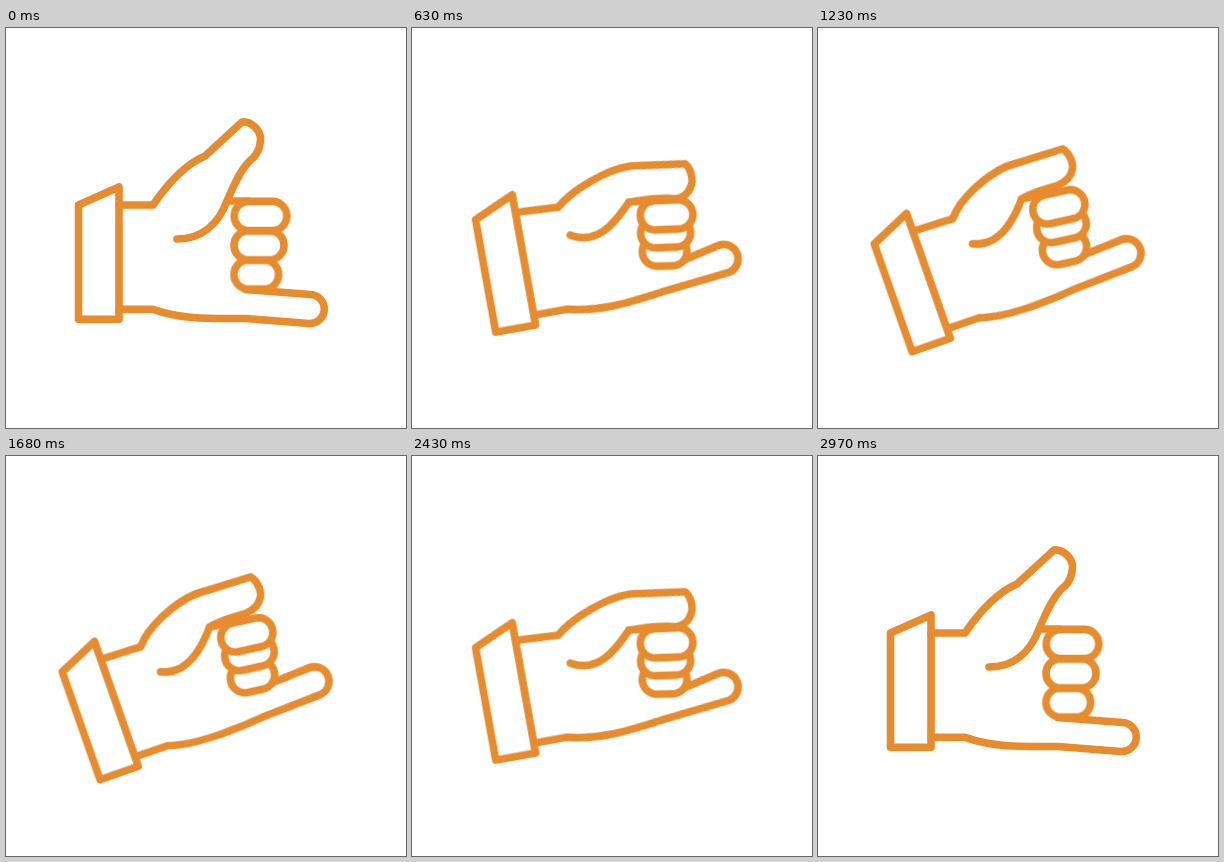
Animation of 400 by 400 pixels, one loop 3 s. Source, as an HTML page without scripts:

```html
<!DOCTYPE html>
<html lang="en">
<head>
<meta charset="utf-8">
<title>Call me</title>
<style>
html, body { margin: 0; height: 100%; overflow: hidden; background: #fff; }
svg { display: block; width: 100%; height: 100%; }
.hand {
  fill: none; stroke: #e78b2d; stroke-width: 7.6;
  stroke-linecap: round; stroke-linejoin: round;
  transform-origin: 92.5px 229.5px;
}
.hand, .hand * { animation: 3s linear infinite; }
.hand { animation-name: tilt; }
.hand .thumb { animation-name: thumb; }
.hand .pinky { animation-name: pinky; }
.finger { fill: #fff; }
.hand .f1 { animation-name: f1; }
.hand .f2 { animation-name: f2; }
.hand .f3 { animation-name: f3; }

/* One shake lasts 15% of the loop: curled at 6%, tilted back at 11%. */
@keyframes tilt {
  0%, 2%, 17%, 32%, 47%, 62%, 77%, 93%, 100% {
    transform: translateY(0) rotate(0deg);
    animation-timing-function: cubic-bezier(.47, 0, .745, .715);
  }
  6%, 21%, 36%, 51%, 66%, 81% {
    transform: translateY(10px) rotate(-10deg);
    animation-timing-function: cubic-bezier(.39, .575, .565, 1);
  }
  9.6%, 24.6%, 39.6%, 54.6%, 69.6%, 84.6% {
    transform: translateY(33px) rotate(-22deg);
    animation-timing-function: cubic-bezier(.33, 0, .67, .33);
  }
  11%, 26%, 41%, 56%, 71%, 86% {
    transform: translateY(29.4px) rotate(-19.4deg);
    animation-timing-function: cubic-bezier(.3, .2, .6, 1);
  }
}
@keyframes thumb {
  0%, 1%, 16%, 31%, 46%, 61%, 76%, 99%, 100% {
    d: path("M113 177 L147 177 C160 158 178 137 199 128 L236 94 C245 93 255 102 254.500 112 C254 120 251 126 247 130 C237 137 229 154 221 173 C212 197 195 211 171 211 M221 173 L242 173");
    animation-timing-function: ease-in-out;
  }
  6%, 21%, 36%, 51%, 66%, 81% {
    d: path("M113.700 177 L156 179.300 C172.700 165 210.800 150.300 235 151.600 L288.500 159 C293 162.800 294.600 176.300 290.600 181.700 C287.200 189.200 279.600 192 273.500 192 C260 187.500 245 186.800 226.700 186.700 C213 200.500 190.500 225 163 209 M226.700 186.700 L249.600 189.700");
  }
  11%, 26%, 41%, 56%, 71%, 86% {
    d: path("M115 178 L154.700 179.300 C169.200 162.200 201.400 149 224.200 147.600 L281.700 149.800 C287 156 287.700 169 283 173.600 C279.600 179.800 272.600 181.600 266 182.500 C252.400 182 237 180.700 226.400 183.400 C213.500 199 190.700 221.700 165.300 209.500 M226.400 183.400 L245.700 186");
    animation-timing-function: ease-in-out;
  }
  89% {
    d: path("M113 177 L147 177 C159 157 174 134 194 123 L224 82 C234 80 244 89 243.500 98 C244 107 242 114 239 119 C231 130 226 152 221 173 C212 197 195 211 171 211 M221 173 L242 173");
    animation-timing-function: ease-in-out;
  }
}
@keyframes pinky {
  0%, 15%, 30%, 45%, 60%, 75%, 90%, 100% {
    d: path("M240 261.500 L304.500 266.500 A14.500 14.500 0 0 1 303 295.500 L240 290.500 C205 290.500 178 292 147 281.300 L113 281.300");
    animation-timing-function: ease-in-out;
  }
  6%, 21%, 36%, 51%, 66%, 81% {
    d: path("M258 256.200 L307.800 245 A14.500 14.500 0 0 1 313 273.500 L243.600 281 C217.600 284.600 181 290.300 146.500 281.300 L114 281.300");
    animation-timing-function: cubic-bezier(.4, 0, .7, .8);
  }
  11%, 26%, 41%, 56%, 71%, 86% {
    d: path("M255.600 257.200 L307 254.700 A14.500 14.500 0 0 1 308 283.700 L246.500 286 C218 288.600 175 290.800 147.300 281.500 L115 281.300");
    animation-timing-function: ease-out;
  }
}
@keyframes f1 {
  0%, 15%, 30%, 45%, 60%, 75%, 90%, 100% {
    transform: translate(254.5px, 188px) rotate(0deg);
    animation-timing-function: ease-in-out;
  }
  6%, 21%, 36%, 51%, 66%, 81% { transform: translate(261.4px, 206px) rotate(8deg); }
  11%, 26%, 41%, 56%, 71%, 86% {
    transform: translate(259px, 203.4px) rotate(7deg);
    animation-timing-function: ease-out;
  }
}
@keyframes f2 {
  0%, 15%, 30%, 45%, 60%, 75%, 90%, 100% {
    transform: translate(253px, 217.3px) rotate(0deg);
    animation-timing-function: ease-in-out;
  }
  6%, 21%, 36%, 51%, 66%, 81% { transform: translate(257.3px, 223.5px) rotate(8deg); }
  11%, 26%, 41%, 56%, 71%, 86% {
    transform: translate(255.2px, 222px) rotate(7deg);
    animation-timing-function: ease-out;
  }
}
@keyframes f3 {
  0%, 15%, 30%, 45%, 60%, 75%, 90%, 100% {
    transform: translate(250.3px, 246.5px) rotate(0deg);
    animation-timing-function: ease-in-out;
  }
  6%, 21%, 36%, 51%, 66%, 81% { transform: translate(253px, 241.6px) rotate(9deg); }
  11%, 26%, 41%, 56%, 71%, 86% {
    transform: translate(250.5px, 244.3px) rotate(7deg);
    animation-timing-function: ease-out;
  }
}
</style>
</head>
<body>
<svg viewBox="0 0 400 400">
  <g class="hand">
    <path class="pinky"/>
    <rect class="finger f3" x="-22.3" y="-14.6" width="44.6" height="29.2" rx="14.6"/>
    <rect class="finger f2" x="-25" y="-14.6" width="50" height="29.2" rx="14.6"/>
    <rect class="finger f1" x="-26.3" y="-14.6" width="52.6" height="29.2" rx="14.6"/>
    <path class="thumb"/>
    <path d="M72.500 177 L113 159 V291.300 H72.500 Z"/>
  </g>
</svg>
</body>
</html>
```
